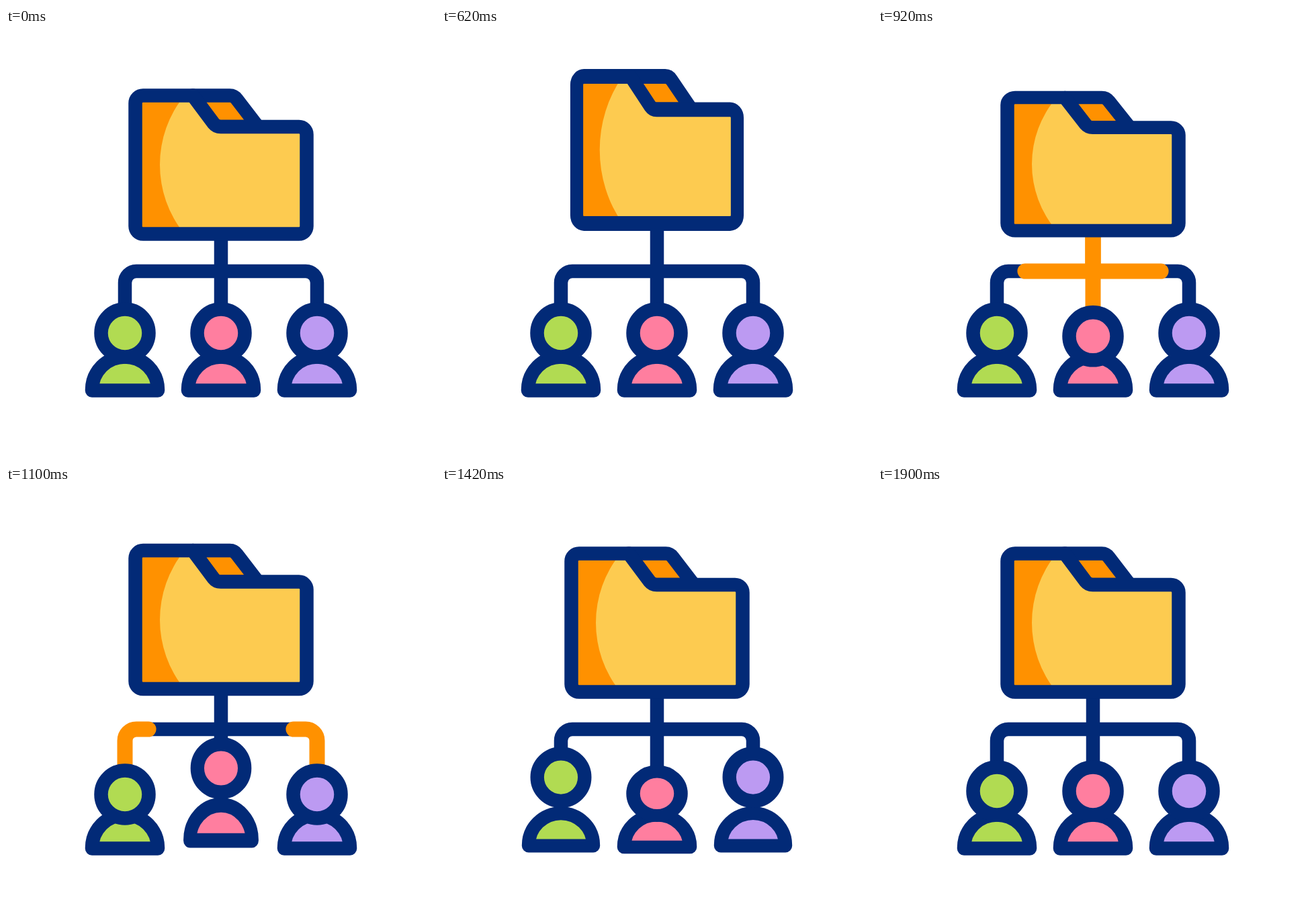
Write an HTML page that moves like this. It is 640 by 640 pixels and loops after 1960 ms.

```html
<!DOCTYPE html>
<html lang="en">
<head>
<meta charset="utf-8">
<title>Shared folder</title>
<style>
  html, body { margin: 0; width: 100%; height: 100%; overflow: hidden; background: #fff; }
  svg { display: block; width: 100%; height: 100%; }
  .line { stroke: #022a77; stroke-width: 20.5; stroke-linejoin: round; }
  .flow { fill: none; stroke: #ff9100; stroke-width: 23; stroke-linecap: round; stroke-linejoin: round; }
</style>
</head>
<body>
<svg id="stage" viewBox="0 0 640 640">
  <g class="line" fill="none">
    <path d="M177 430V379a17 17 0 0 1 17-17H446a17 17 0 0 1 17 17V430"/>
    <path d="M320 290V430"/>
  </g>
  <g>
    <path class="flow" d="M320 290V362H194a17 17 0 0 0-17 17V430"/>
    <path class="flow" d="M320 290V362H446a17 17 0 0 1 17 17V430"/>
    <path class="flow" d="M320 290V430"/>
  </g>
  <g id="folder">
    <path class="line" fill="#ff9100" d="M278 100.5H333Q339.5 100.5 343.5 106L375 147H312Z"/>
    <path fill="#ff9100" d="M192.5 100.5H278L313 147H447.5V306.5H192.5Z"/>
    <path fill="#fdcb50" d="M265.5 100.5H278L313 147H447.5V306.5H265.5A163.6 163.6 0 0 1 265.5 100.5Z"/>
    <path class="line" fill="none" d="M204 100.5H278L309 142Q313 147 319.5 147H436a11.5 11.5 0 0 1 11.5 11.5V295a11.5 11.5 0 0 1-11.5 11.5H204a11.5 11.5 0 0 1-11.5-11.5V112a11.5 11.5 0 0 1 11.5-11.5Z"/>
  </g>
</svg>
<script>
const LOOP = 1960;
const stage = document.getElementById('stage');
const folder = document.getElementById('folder');
const flows = [...document.querySelectorAll('.flow')]
  .map(path => ({ path, length: path.getTotalLength() }));

// Vertical offsets in px, scale changes as fractions, landing in ms after the start.
const FOLDER = { dip: 4, height: 22, settle: 0, rebound: 9, crouch: .048, stretch: .063, squash: .047, landing: 640 };
const BODY = { dip: 0, height: 14.5, settle: 1.5, rebound: 5.5, crouch: 0, stretch: .062, squash: .105, landing: 560 };
const HEAD = { dip: 5, height: 38, settle: 4, rebound: 11, crouch: 0, stretch: .01, squash: .08, landing: 640 };

const clamp = (v, lo, hi) => Math.min(hi, Math.max(lo, v));
const progress = (t, from, to) => clamp((t - from) / (to - from), 0, 1);
const ease = p => (1 - Math.cos(Math.PI * p)) / 2;
const pulse = (t, from, peak, to) => ease(progress(t, from, peak)) - ease(progress(t, peak, to));

// Crouch, leap, landing and a small rebound, each blending into the next.
function hop(part, t) {
  const crouch = pulse(t, 0, 170, 370);
  const leap = pulse(t, 170, 370, part.landing);
  const land = pulse(t, 370, part.landing, 790);
  const bounce = pulse(t, part.landing, 790, 910);
  return {
    dy: part.dip * crouch - part.height * leap + part.settle * land - part.rebound * bounce,
    sx: 1 - part.stretch * leap,
    sy: 1 - part.crouch * crouch + part.stretch * leap - part.squash * land ** 2
  };
}

function shape(tag, attrs) {
  const el = document.createElementNS('http://www.w3.org/2000/svg', tag);
  for (const name in attrs) el.setAttribute(name, attrs[name]);
  return stage.appendChild(el);
}

const movers = [{ el: folder, part: FOLDER, x: 320, y: 203.5, start: 250 }];

function addPerson(x, fill, start) {
  const body = shape('path', { class: 'line', fill, d: `M${x - 49} 539.5v-1a49 49 0 0 1 98 0v1Z` });
  const head = shape('circle', { class: 'line', fill, cx: x, cy: 454, r: 35.5 });
  movers.push({ el: body, part: BODY, x, y: 515, start });
  movers.push({ el: head, part: HEAD, x, y: 454, start });
}
addPerson(177, '#b1db52', 930);
addPerson(320, '#ff7e9f', 770);
addPerson(463, '#bc9af2', 930);

const flowSpan = Math.max(...flows.map(f => f.length));

function render(t) {
  for (const { el, part, x, y, start } of movers) {
    const { dy, sx, sy } = hop(part, t - start);
    el.setAttribute('transform',
      `translate(${x} ${y + dy}) scale(${sx} ${sy}) translate(${-x} ${-y})`);
  }
  const front = flowSpan * progress(t, 690, 1058);
  const back = flowSpan * progress(t, 915, 1200);
  for (const { path, length } of flows) {
    const head = Math.min(front, length);
    const tail = Math.min(back, length);
    path.style.display = head > tail ? '' : 'none';
    path.setAttribute('stroke-dasharray', `${head - tail} 999`);
    path.setAttribute('stroke-dashoffset', -tail);
  }
}

const begin = performance.now();
function tick() {
  render((performance.now() - begin) % LOOP);
  requestAnimationFrame(tick);
}
tick();
</script>
</body>
</html>
```
